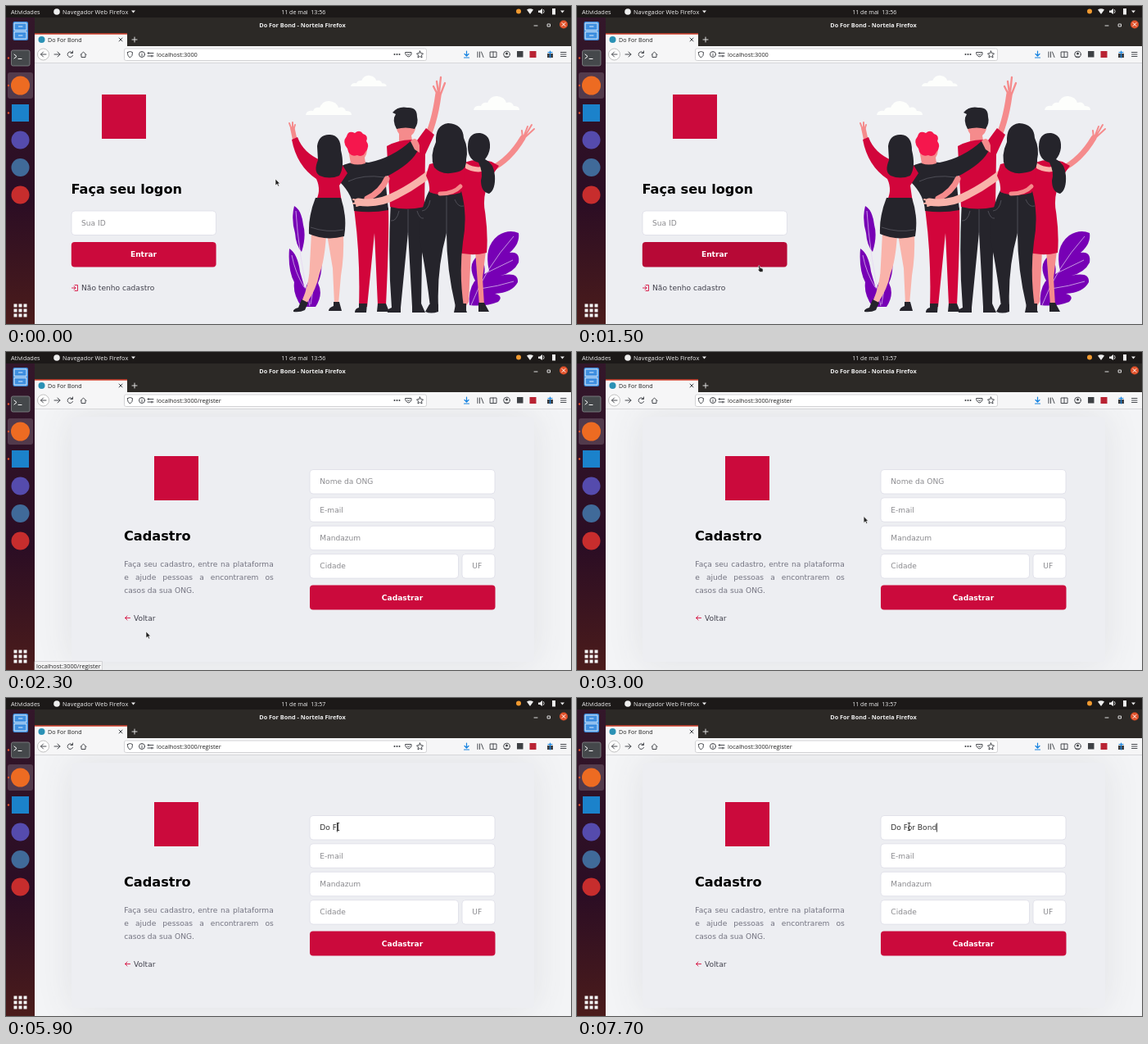
An HTML page for the animation above (8000 ms loop, 690 px wide and 388 px high).

```html
<!DOCTYPE html>
<html lang="pt-BR">
<head>
<meta charset="utf-8">
<title>Do For Bond</title>
<style>
html, body { margin: 0; width: 100%; height: 100%; overflow: hidden; background: #edeef2; }
svg { display: block; position: absolute; left: 0; top: 0; }
.ui { font: 7.4px "Open Sans", sans-serif; }
.page { font: 9.1px "DejaVu Sans", sans-serif; fill: #41414d; }
.b { font-weight: bold; }
.mid { text-anchor: middle; }
.h { font-size: 16.15px; font-weight: bold; fill: #000; }
.ph { fill: #8b8b8f; }
.field { fill: #fff; stroke: #dcdce6; stroke-width: .8; }
.red { fill: #cb0a3c; }
.wear { fill: #d2053b; }
.dark { fill: #25242b; }
.skin { fill: #f58b8c; }
.pale { fill: #f9b3aa; }
.limb { fill: none; stroke-linecap: round; stroke-linejoin: round; }
.line { fill: none; stroke: #484b50; stroke-width: 1; stroke-linecap: round; stroke-linejoin: round; }
.vein { fill: none; stroke: #e6d5f4; stroke-width: .7; }
.thin { fill: none; stroke: #777780; stroke-width: .5; }
.para { font: 9.1px/16px "DejaVu Sans", sans-serif; color: #737380; width: 182.5px; }
.para div { text-align: justify; text-align-last: justify; }
.para div:last-child { text-align-last: left; }
</style>
</head>
<body>
<svg width="690" height="388" viewBox="0 0 690 388">
<defs>
  <linearGradient id="dock" x1="0" y1="0" x2="0" y2="1">
    <stop offset="0" stop-color="#33172a"/><stop offset=".6" stop-color="#2b0d24"/><stop offset="1" stop-color="#4b1c1b"/>
  </linearGradient>
  <filter id="shadow" x="-20%" y="-30%" width="140%" height="160%"><feGaussianBlur stdDeviation="23"/></filter>
  <clipPath id="view"><path d="M35 69H690V388H35z"/></clipPath>
  <path id="cloud" fill="#fdfefc" d="M0 18Q1 12 9 13Q11 8 17 9Q21 0 29 1Q38 2 40 9Q47 7 49 13Q56 13 56 18z"/>
</defs>

<!-- login page -->
<g id="login" class="page">
  <path fill="#edeef2" d="M35 69H690V388H35z"/>
  <rect class="red" x="117" y="108" width="54" height="54"/>
  <text class="h" x="79.5" y="229">Faça seu logon</text>
  <rect class="field" x="80" y="250" width="176.5" height="29.5" rx="4"/>
  <text class="ph" x="92" y="268">Sua ID</text>
  <rect id="enter" x="79.800" y="288" width="176.800" height="30.500" rx="4"/>
  <text class="b mid" x="168" y="306" fill="#fff">Entrar</text>
  <g id="signup">
    <path class="line" style="stroke:#d92350" d="M84 340.500H87.500V347.500H84M80.500 344H85M83 342L85 344L83 346"/>
    <text x="92" y="347">Não tenho cadastro</text>
  </g>

  <use href="#cloud" x="366" y="115"/>
  <use href="#cloud" x="571" y="109"/>
  <use href="#cloud" transform="translate(421 84) scale(.78)"/>

  <g fill="#7700b5">
    <path d="M352 244Q361 249 363 267Q367 281 361 300Q354 292 353 277Q348 260 352 244zM346 296Q356 302 359 324L365 345L370 335Q371 314 384 304Q388 322 381 338Q388 352 378 367H361Q350 352 352 337Q344 322 346 296z"/>
    <path d="M566 365Q564 348 572 336L590 323Q583 294 601 280Q614 272 626 277Q628 290 615 301Q628 299 626 313Q620 325 604 329Q626 324 625 337Q618 350 597 351Q608 354 601 361Q586 367 566 365zM574 337Q562 316 576 305Q587 312 584 328z"/>
  </g>
  <path class="vein" d="M354 250Q357 300 371 366M349 304Q353 325 364 343M372 364Q376 337 382 313M568 365Q585 320 620 281M578 342L575 313M588 325L619 310M579 345Q601 342 620 336"/>

  <!-- woman, right -->
  <path class="skin" d="M555 298H568L565 361L560 369H555zM573 298H586L582 332L584 365H578z"/>
  <path class="dark" d="M554 363H562V373H548zM577 362H584L590 373H577z"/>
  <path class="limb" stroke="#f58b8c" stroke-width="7" d="M592 199Q615 188 631 161"/>
  <path class="limb" stroke="#f58b8c" stroke-width="2" d="M631 161L630 152M632 160L637 147M633 160L642 145M633 161L645 150"/>
  <path class="wear" d="M560 191Q575 185 593 190L602 195L592 209Q581 231 585 251Q589 279 587 301Q568 306 549 300Q555 274 551 253Q558 231 553 213z"/>
  <path class="limb" stroke="#f9b3aa" stroke-width="6" d="M560 194Q574 203 588 197"/>
  <path class="dark" d="M564 172Q564 154 579 155Q592 157 591 173Q590 181 585 187Q596 192 597 207Q598 224 590 229Q580 227 580 213Q583 203 577 191Q564 188 564 172z"/>

  <!-- man, centre -->
  <path class="dark" d="M470 240H511Q515 272 508 303L507 367H496L491 276L482 368H471Q466 307 470 240z"/>
  <path class="dark" d="M471 364H482V374H466Q465 370 471 368zM496 363H507L512 374H496z"/>
  <path class="limb" stroke="#f58b8c" stroke-width="7.500" d="M510 169Q523 146 528 108"/>
  <path class="limb" stroke="#f58b8c" stroke-width="2.300" d="M527 108L522 98M528 106L526 92M529 105L531 87M531 107L536 94"/>
  <path class="skin" d="M477 138H500Q502 153 495 158L497 170H480V156Q475 150 477 138z"/>
  <path class="wear" d="M465 171Q484 161 502 164L513 149L523 157L512 181L511 245Q489 250 469 245z"/>
  <path class="dark" d="M477 150Q471 139 476 132L472 130Q479 122 490 124Q502 123 502 135Q504 143 499 150Q488 147 477 150z"/>

  <!-- man with bright hair -->
  <path class="wear" d="M425 247L467 246Q468 280 464 365H454L450 277L441 367H431Q433 306 425 247z"/>
  <path class="dark" d="M431 363H441L440 374H426Q426 369 431 368zM454 363H464L468 373H453z"/>
  <path class="dark" d="M408 196Q422 188 443 191Q472 185 494 165L504 174Q497 192 463 209L467 249Q446 253 425 250Q424 231 408 215z"/>
  <path class="skin" d="M494 165Q501 157 505 170L505 179L499 175z"/>
  <path class="skin" d="M416 163H440Q443 178 438 185L439 192Q429 195 421 192L419 181z"/>
  <path fill="#f5174d" d="M417 174Q410 166 416 159Q418 151 426 155Q432 150 436 156Q443 158 440 165Q445 171 439 178Q436 185 429 182Q419 185 417 174z"/>
  <path class="limb" stroke="#f58b8c" stroke-width="7" d="M465 211Q458 227 441 235"/>

  <!-- woman, right of centre -->
  <path class="dark" d="M517 225L556 226Q564 255 558 288Q553 325 559 367H549Q538 321 538 277Q526 321 528 367H518Q512 316 504 280Q506 246 517 225z"/>
  <path class="dark" d="M517 364H528V373Q519 376 512 373zM549 364H559L563 374H547z"/>
  <path class="limb" stroke="#f9b3aa" stroke-width="9" d="M518 204Q498 220 478 230Q455 243 430 239"/>
  <path class="limb" stroke="#f9b3aa" stroke-width="2" d="M432 238L424 236M432 240L424 241M434 242L428 244"/>
  <path class="wear" d="M517 193Q538 186 561 195Q562 214 555 228Q535 234 517 227Q518 217 513 207z"/>
  <path class="limb" stroke="#f58b8c" stroke-width="5" d="M555 220Q547 229 530 229"/>
  <path class="dark" d="M525 166Q524 145 540 143Q558 144 559 161Q565 174 562 187Q563 201 549 203Q532 207 523 197Q517 183 525 166z"/>

  <!-- woman, left -->
  <path class="pale" d="M373 277L391 280Q389 311 383 326Q379 346 367 363L361 361Q371 338 371 315zM392 279L412 277Q413 306 409 329L406 364H401L399 320z"/>
  <path class="dark" d="M361 358L369 362L365 371Q359 374 351 373Q350 370 357 368zM400 361L407 361L410 372H394Q394 368 400 366z"/>
  <path class="limb" stroke="#f58b8c" stroke-width="5.500" d="M350 150L353 164"/>
  <path class="limb" stroke="#f58b8c" stroke-width="2" d="M349 151L346 143M350 150L350 142M351 151L353 145"/>
  <path class="wear" d="M349 163L356 160Q363 179 384 188L409 191L417 204L407 219L410 240L377 240Q386 226 379 211Q355 195 349 163z"/>
  <path class="dark" d="M378 234H409Q417 258 413 281Q390 287 370 278Q369 256 378 234z"/>
  <path class="dark" d="M380 171Q382 156 396 157Q409 158 409 176Q414 196 407 207Q395 212 383 207Q375 202 381 188z"/>

  <path class="thin" d="M491 248V278M470 262Q477 263 480 250M502 250Q505 260 510 259M538 232V279M508 250Q516 249 518 237M548 236Q552 246 559 244M372 270Q392 277 412 273M418 214Q436 205 462 209"/>
</g>

<!-- registration page -->
<g id="register" class="page" clip-path="url(#view)">
  <path fill="#f3f4f6" d="M35 69H690V388H35z"/>
  <rect x="80" y="79" width="565" height="299" opacity=".1" filter="url(#shadow)"/>
  <rect x="80" y="79" width="565" height="299" rx="4" fill="#edeef2"/>
  <rect class="red" x="181" y="127" width="54" height="54"/>
  <text class="h" x="144" y="230">Cadastro</text>
  <foreignObject x="144.300" y="250.500" width="190" height="50">
    <div class="para"><div>Faça seu cadastro, entre na plataforma</div><div>e ajude pessoas a encontrarem os</div><div>casos da sua ONG.</div></div>
  </foreignObject>
  <path class="line" style="stroke:#d92350" d="M151.500 324.500H145.500M148 322L145.500 324.500L148 327"/>
  <text x="156" y="328">Voltar</text>
  <g id="fields"></g>
  <text id="typed" x="383.300" y="161" fill="#333" style="white-space:pre"></text>
  <rect id="caret" y="152.500" width=".8" height="11" fill="#222"/>
  <rect class="red" x="371" y="284.500" width="226.500" height="30" rx="4"/>
  <text class="b mid" x="484" y="302.500" fill="#fff">Cadastrar</text>
</g>

<!-- desktop and browser chrome -->
<g class="ui">
  <path fill="#1c1918" d="M0 0H690V14H0z"/>
  <path fill="url(#dock)" d="M0 14H35V388H0z"/>
  <path fill="#2c2926" d="M35 14H690V49H35z"/>
  <path fill="#f6f6f7" d="M35 34H148V49H690V69H35z"/>
  <path fill="#d4432f" d="M35 33.300H148V34.800H35z"/>
  <path fill="#cfcfd2" d="M35 69H690V69.700H35z"/>
  <g fill="#eee">
    <text x="6" y="9.500">Atividades</text>
    <text x="69" y="9.500">Navegador Web Firefox</text>
    <text class="mid" x="363.300" y="9.500" style="font-size:7.100px;white-space:pre" id="clock"></text>
    <text class="b mid" x="362" y="25.500" style="font-size:7.300px">Do For Bond - Nortela Firefox</text>
    <circle cx="62" cy="7" r="3.800"/>
    <path d="M153 5.500H158L155.500 8.500zM677 5.500H682L679.500 8.500zM636 4.500Q640 2 644 4.500L640 10zM650 5.500H652L655 3V10L652 8H650zM667 3H671V10.500H667z"/>
  </g>
  <path class="line" style="stroke:#ddd" d="M656.500 4.500Q658 6.500 656.500 8.500M645 24H649M661.500 22H664.500V25H661.500zM154 41H160M157 38V44"/>
  <circle cx="626" cy="6.500" r="3" fill="#f19a30"/>
  <circle cx="681" cy="22.500" r="5" fill="#e1522b"/>
  <path class="line" style="stroke:#fff" d="M679 20.500L683 24.500M683 20.500L679 24.500"/>
  <circle cx="43.500" cy="41" r="4" fill="#2a91b5"/>
  <text x="51" y="43.500" fill="#222" style="font-size:7.100px">Do For Bond</text>
  <rect x="144.500" y="52" width="369" height="14.500" rx="2" fill="#fff" stroke="#c9c9cc" stroke-width=".8"/>
  <circle cx="45.500" cy="59" r="7" fill="#fff" stroke="#aaa" stroke-width=".7"/>
  <path class="line" d="M138 39L142 43M142 39L138 43M49 59H42.500M45.500 56L42.500 59L45.500 62M59 59H66M63 56L66 59L63 62M81 57A3.300 3.300 0 1 0 81.500 60.500M81.500 55V57.500H79M91 59.500L94.500 56L98 59.500M92 59V62.500H97V59M148.500 56.500L151.500 55.500L154.500 56.500Q155 61 151.500 63Q148 61 148.500 56.500zM166 58.700V61M166 56.900V57M173 57.500H180M173 61H180M174 56.500V58.500M178 60V62M488 56.500H495V59Q491.500 65 488 59zM490 58.500L491.500 60L493 58.500M505.500 55L506.700 57.700L509.500 58L507.500 60L508 63L505.500 61.500L503 63L503.500 60L501.500 58L504.300 57.700zM576 56V62.500M578.500 56V62.500M580.500 56L583 62.500M591.500 56H599V62.500H591.500zM595 56V62.500M677.500 56.500H684M677.500 59H684M677.500 61.500H684"/>
  <circle class="line" cx="166" cy="59" r="3.500"/>
  <circle class="line" cx="611.500" cy="59" r="3.800"/>
  <g fill="#3e4145">
    <circle cx="474.500" cy="59" r="1"/><circle cx="477.500" cy="59" r="1"/><circle cx="480.500" cy="59" r="1"/>
    <circle cx="611.500" cy="58" r="1.500"/><path d="M609 61.500H614V62.500H609z"/>
    <rect x="624" y="55" width="7.500" height="7.500"/><rect x="661" y="58" width="7" height="5"/>
  </g>
  <rect x="639.500" y="55" width="8" height="8" fill="#b92333"/>
  <path class="line" style="stroke:#1683e0;stroke-width:1.200" d="M562.500 55V61M560 58.500L562.500 61L565 58.500M559.500 63H565.500M662 56.500H667M664.500 55V63"/>
  <text id="url" x="184" y="61.800" fill="#222"></text>

  <rect x="2" y="81" width="31" height="32" rx="3" fill="#fff" opacity=".17"/>
  <rect x="8.500" y="19" width="18.500" height="23" rx="2" fill="#3f8fe0"/>
  <path class="line" style="stroke:#d9eafa" d="M10.500 21H25V29.500H10.500zM10.500 31.500H25V40H10.500zM15.500 25H20M15.500 36H20"/>
  <rect x="6.500" y="54" width="22.500" height="19" rx="2" fill="#45484b" stroke="#85898b" stroke-width=".8"/>
  <path class="line" style="stroke:#fff" d="M10 59L13 61.500L10 64M15 64.500H19"/>
  <circle cx="17.500" cy="97" r="11.500" fill="#ed6b22"/>
  <rect x="7" y="120" width="21" height="21" fill="#1b82cb"/>
  <circle cx="17.500" cy="163.500" r="11" fill="#554bad"/>
  <circle cx="17.500" cy="197" r="11" fill="#406a99"/>
  <circle cx="17.500" cy="230.500" r="11" fill="#c72d2d"/>
  <g fill="#e2532d"><circle cx="3" cy="63.500" r="1.200"/><circle cx="3" cy="97" r="1.200"/><circle cx="3" cy="130.500" r="1.200"/></g>
  <path class="limb" stroke="#f2f2f2" stroke-width="4" style="stroke-linecap:butt" stroke-dasharray="4 2" d="M9.500 365.500H25.500M9.500 371.500H25.500M9.500 377.500H25.500"/>
  <g id="status">
    <path fill="#f4f4f5" stroke="#c8c8cb" stroke-width=".7" d="M35 377.500H117.500V388H35z"/>
    <text x="37" y="385.500" fill="#222">localhost:3000/register</text>
  </g>
</g>

<g id="pointer" stroke-linejoin="round">
  <path id="arrow" fill="#222" stroke="#fff" stroke-width=".6" d="M0 0V8L2 6.300L3.300 9L4.600 8.400L3.400 5.800H5.600z"/>
  <path id="hand" fill="#222" stroke="#fff" stroke-width=".5" d="M0 .5Q1-.5 1.700 .8L2.300 3L5 3.800Q6.300 5 5.300 8H2L-.5 5.500Q-.7 4.500 .8 4.800z"/>
  <path id="beam" fill="none" stroke="#333" stroke-width=".9" d="M-1.700-4.500H1.700M0-4.500V4.500M-1.700 4.500H1.700"/>
</g>
</svg>
<script>
const $ = id => document.getElementById(id);
const show = (id, on) => { $(id).style.display = on ? "" : "none"; };
const NAME = "Do For Bond";
const KEY_TIMES = [4400, 5200, 5400, 5900, 6200, 6400, 6600, 7100, 7300, 7500, 7700];
const CARET_OFF = [[0, 4300], [4600, 5200], [5600, 5700], [6800, 6900]];
// time, x, y
const PATH = [[300, 329, 211], [1500, 221.5, 316.5], [2000, 171, 341], [2350, 171, 341], [3300, 405.5, 157]];

const addField = (label, x, y, width, id = "") => {
  $("fields").innerHTML += `<rect class="field" x="${x}" y="${y}" width="${width}" height="29.5" rx="4"/>
    <text class="ph" id="${id}" x="${x + 12.3}" y="${y + 17.7}">${label}</text>`;
};
addField("Nome da ONG", 371, 143.5, 226, "hint");
addField("E-mail", 371, 177.8, 226);
addField("Mandazum", 371, 212.2, 226);
addField("Cidade", 371, 246.6, 181.5);
addField("UF", 557, 246.6, 40);

function pointerAt(t) {
  const i = PATH.findIndex(p => p[0] > t);
  if (i < 0) return PATH[PATH.length - 1].slice(1);
  if (i === 0) return PATH[0].slice(1);
  const [t0, x0, y0] = PATH[i - 1], [t1, x1, y1] = PATH[i];
  const u = (t - t0) / (t1 - t0), k = u * u * (3 - 2 * u);
  return [x0 + (x1 - x0) * k, y0 + (y1 - y0) * k];
}

function draw(now) {
  const t = Math.floor(now % 8000 / 100) * 100;
  const registering = t >= 2300;
  const [x, y] = pointerAt(t);
  const overButton = !registering && x < 256 && y >= 288 && y < 318.5;
  const overLink = !registering && t >= 1900;
  const overInput = registering && x > 371 && y < 173;

  show("login", !registering);
  show("register", registering);
  show("status", t >= 2000 && t < 2400);
  $("enter").setAttribute("fill", overButton ? "#b70936" : "#cb0a3c");
  $("signup").setAttribute("opacity", overLink ? .8 : 1);
  $("clock").textContent = "11 de mai  13:" + (t < 2500 ? 56 : 57);
  $("url").textContent = "localhost:3000" + (registering ? "/register" : "");

  const typed = NAME.slice(0, KEY_TIMES.filter(k => k <= t).length);
  $("typed").textContent = typed;
  show("hint", !typed);
  show("caret", !CARET_OFF.some(([from, to]) => t >= from && t < to));
  $("caret").setAttribute("x", 383.3 + (registering && typed ? $("typed").getComputedTextLength() : 0));

  $("pointer").setAttribute("transform", `translate(${x} ${y})`);
  show("hand", overButton);
  show("beam", overInput);
  show("arrow", !overButton && !overInput);
}

const start = performance.now();
function tick() {
  draw(performance.now() - start);
  requestAnimationFrame(tick);
}
tick();
</script>
</body>
</html>
```
